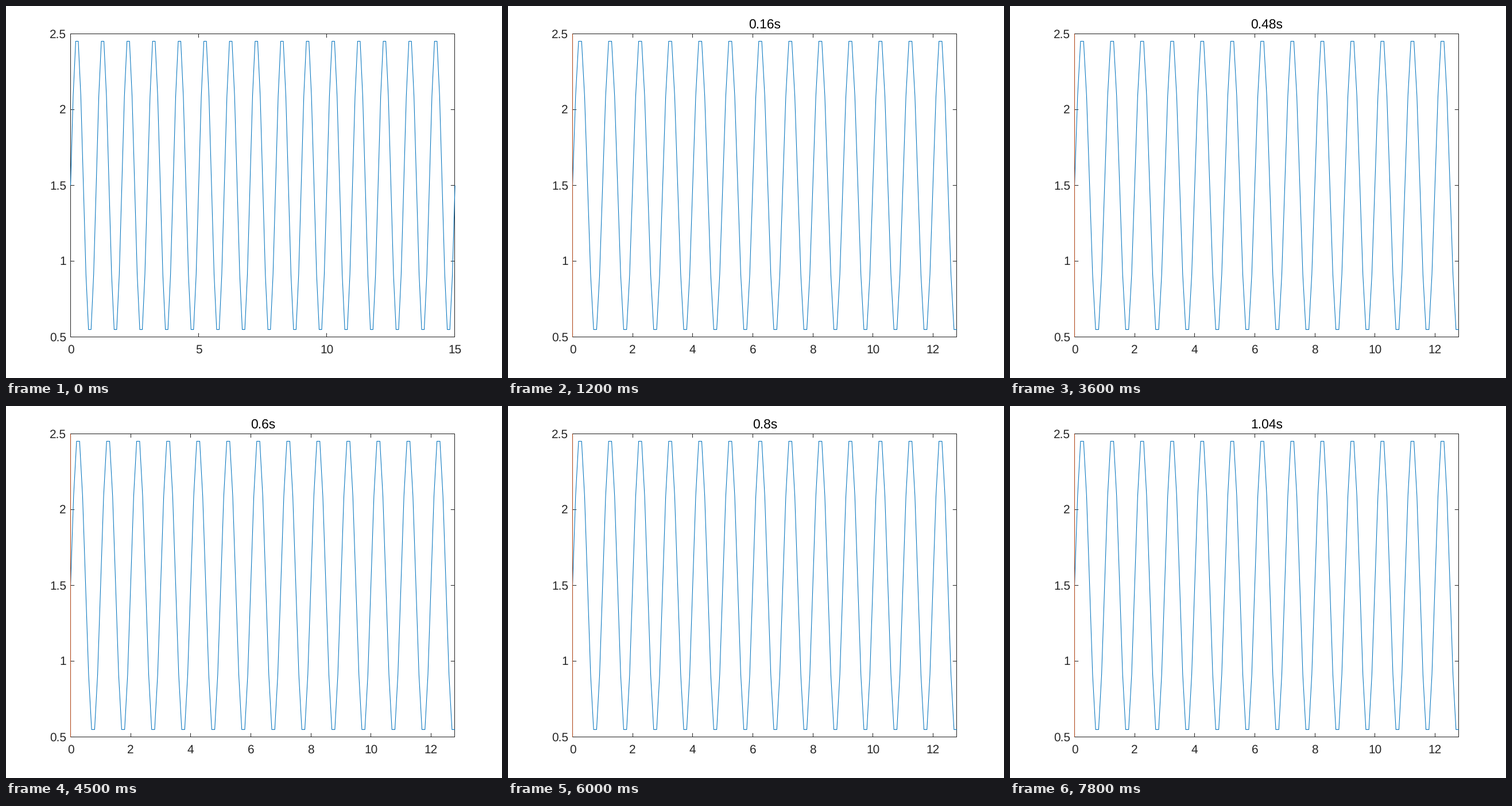
Recreate the animation shown at these times as a matplotlib script. Size 864 px wide and 648 px high, loop 8 s.

```python
import numpy as np
import matplotlib.pyplot as plt
from matplotlib.animation import FuncAnimation

WIDTH, HEIGHT, DPI = 864, 648, 150
LEFT, TOP, BOTTOM = 112.5, 48.5, 576.5
SPAN = 0.775 * WIDTH
RIGHT = LEFT + 669
Y_MIN, Y_MAX = 0.5, 2.5
TICK = 6.7
INK, BLUE, ORANGE = "#262626", "#0072BD", "#D95319"

FRAME_MS, LOOP_MS, STEP_MS = 100, 8000, 300
FRAMES = LOOP_MS // FRAME_MS

plt.rcParams["font.family"] = "Liberation Sans"
plt.rcParams["text.hinting"] = "none"

fig = plt.figure(figsize=(WIDTH / DPI, HEIGHT / DPI), dpi=DPI, facecolor="white")
ax = fig.add_axes([0, 0, 1, 1])
ax.set_xlim(0, WIDTH)
ax.set_ylim(HEIGHT, 0)
ax.axis("off")


def to_x(t, t_max):
    return LEFT + SPAN * t / t_max


def to_y(v):
    return BOTTOM - (BOTTOM - TOP) * (v - Y_MIN) / (Y_MAX - Y_MIN)


def line(xs, ys, color=INK, **style):
    # Coordinates already sit on pixel centres, so automatic snapping is off.
    return ax.plot(xs, ys, color=color, lw=0.5, snap=False,
                   solid_capstyle="butt", **style)[0]


def label(x, baseline, text, ha="center", size=10, color=INK):
    return ax.text(x, baseline, text, ha=ha, va="baseline", fontsize=size, color=color)


def draw_box():
    line([LEFT, RIGHT, RIGHT, LEFT, LEFT], [TOP, TOP, BOTTOM, BOTTOM, TOP])
    for value in np.arange(Y_MIN, Y_MAX + 0.1, 0.5):
        y = to_y(value)
        line([LEFT, LEFT + TICK], [y, y])
        line([RIGHT - TICK, RIGHT], [y, y])
        label(105, y + 6.8, f"{value:g}", ha="right")


def draw_wave(t_max, tick_step):
    """Sampled sine wave with its time axis; returns the artists."""
    t = np.arange(0, t_max + 0.05, 0.1)
    wave = 1.5 + np.sin(2 * np.pi * t)
    artists = [line(to_x(t, t_max), to_y(wave), BLUE, zorder=3)]
    for value in np.arange(0, t_max + 0.01, tick_step):
        x = to_x(value, t_max)
        tick_x = min(np.floor(x) + 0.5, RIGHT)
        artists += [
            line([tick_x, tick_x], [BOTTOM, BOTTOM - TICK]),
            line([tick_x, tick_x], [TOP, TOP + TICK]),
            label(x, 605, f"{value:g}"),
        ]
    return artists


draw_box()
full_view = draw_wave(15, 5)
timed_view = draw_wave(12.8, 2)
timed_view.append(line([LEFT, LEFT], [TOP, BOTTOM], ORANGE, alpha=0.8, zorder=4))
title = label(LEFT + SPAN / 2, 39, "", size=11, color="black")


def update(frame):
    step = frame * FRAME_MS // STEP_MS
    for artist in full_view:
        artist.set_visible(step == 0)
    for artist in timed_view:
        artist.set_visible(step > 0)
    title.set_text(f"{step * 0.04:g}s" if step else "")
    return [*full_view, *timed_view, title]


anim = FuncAnimation(fig, update, frames=FRAMES, interval=FRAME_MS,
                     repeat=True, repeat_delay=0, blit=False)
plt.show()
```
